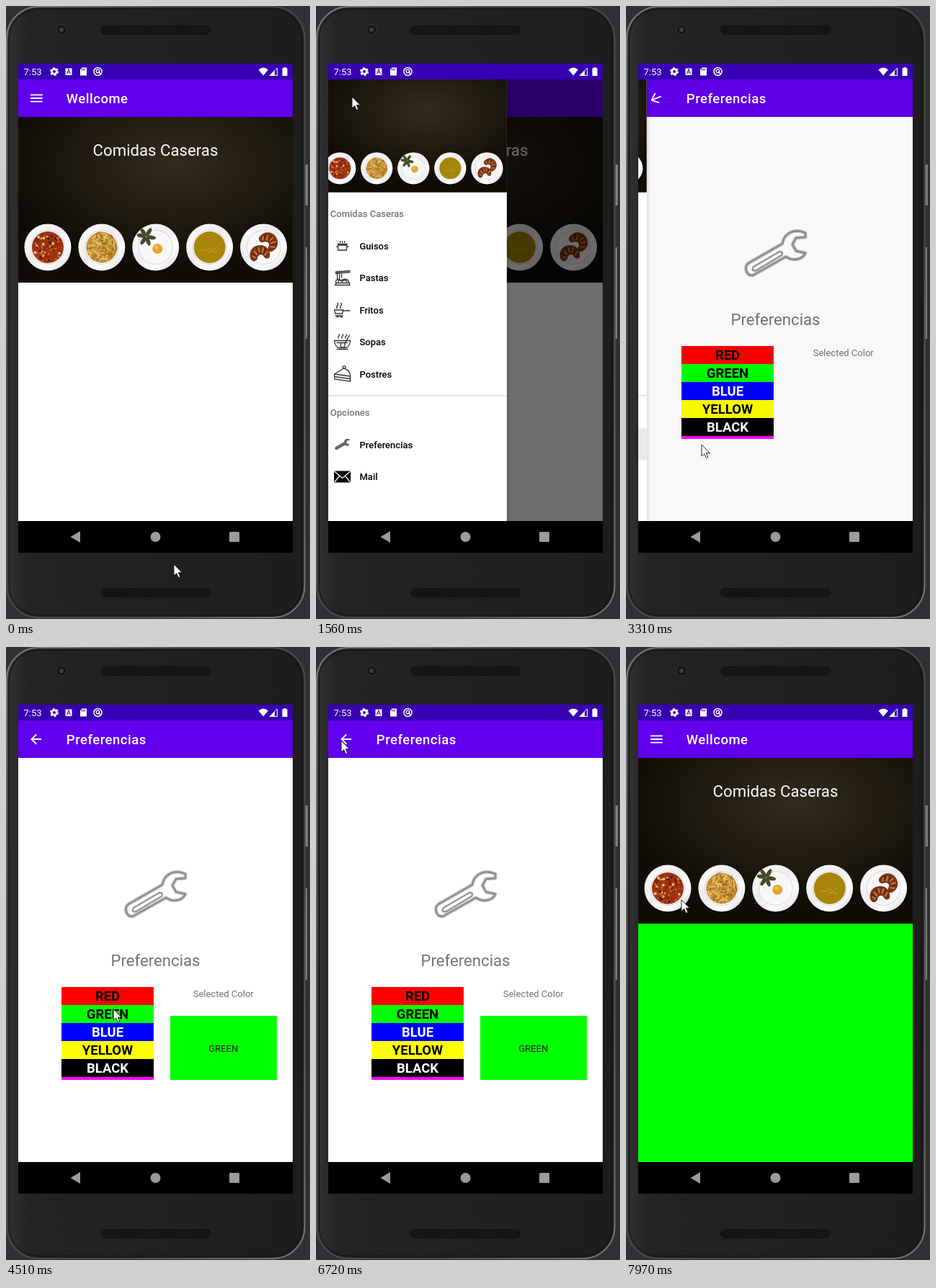
Animation, 422 px wide and 851 px high, one loop 8 s. Source, as an HTML page:

```html
<!DOCTYPE html>
<html lang="es">
<head>
<meta charset="utf-8">
<title>Comidas Caseras</title>
<style>
html, body { margin: 0; width: 100%; height: 100%; overflow: hidden; background: #303134; }
svg { display: block; width: 100%; height: 100%; }
text { font-family: Roboto, sans-serif; font-size: 13px; }
.big { font-size: 22.2px; text-anchor: middle; }
.bar { font-size: 18.5px; font-weight: 500; letter-spacing: .027em; fill: #fff; }
.mid { text-anchor: middle; }
.row { font-size: 18.5px; font-weight: 700; text-anchor: middle; }
.item { font-weight: 500; }
.grey { fill: #757575; }
.line { fill: none; stroke: #333; stroke-width: 1.3; }
</style>
</head>
<body>
<svg viewBox="0 0 422 851" preserveAspectRatio="none">
  <defs>
    <linearGradient id="shell" x2="1" y2="0">
      <stop stop-color="#333334"/><stop offset=".07" stop-color="#232324"/><stop offset="1" stop-color="#1d1d1e"/>
    </linearGradient>
    <linearGradient id="rim" x2="1" y2="1">
      <stop stop-color="#7c7d7f"/><stop offset=".3" stop-color="#4a4b4d"/><stop offset=".7" stop-color="#48494b"/><stop offset="1" stop-color="#77787a"/>
    </linearGradient>
    <radialGradient id="wall" cx=".57" cy=".28" r=".62">
      <stop stop-color="#322b1d"/><stop offset=".5" stop-color="#221c11"/><stop offset="1" stop-color="#110d06"/>
    </radialGradient>
    <linearGradient id="china" x2="1" y2="1">
      <stop stop-color="#fff"/><stop offset=".45" stop-color="#ecebee"/><stop offset=".7" stop-color="#fff"/><stop offset="1" stop-color="#cfcdd1"/>
    </linearGradient>
    <linearGradient id="shade" x2="1" y2="0">
      <stop stop-color="#000" stop-opacity=".1"/><stop offset="1" stop-color="#000" stop-opacity="0"/>
    </linearGradient>
    <pattern id="mesh" width="4" height="4" patternUnits="userSpaceOnUse">
      <rect width="4" height="4" fill="#0d0d0d"/><circle cx="1" cy="1" r=".8" fill="#303030"/><circle cx="3" cy="3" r=".8" fill="#303030"/>
    </pattern>
    <clipPath id="content"><rect x="17" y="102" width="381" height="613"/></clipPath>
    <clipPath id="list"><rect x="77" y="472" width="128" height="129"/></clipPath>
    <g id="photo">
      <rect width="381" height="230" fill="url(#wall)"/>
      <g id="plates"></g>
    </g>
    <path id="wrench" d="M249 315C236 309 220 313 217 330L170 357C163 362 167 375 176 374L222 348C232 355 245 352 249 343L236 340L231 331L236 322L249 321Z"/>
  </defs>

  <rect width="422" height="851" fill="#303134"/>
  <path d="M415.500 220h3.500v57h-3.500zM415.500 335h2.500v127h-2.500z" fill="#7b7c80"/>
  <rect x="1" y="1" width="413.500" height="848" rx="44" fill="url(#shell)" stroke="url(#rim)" stroke-width="2"/>
  <rect x="4.500" y="4.500" width="406" height="841" rx="40" fill="none" stroke="#111"/>
  <g fill="url(#mesh)" stroke="#111">
    <rect x="131.500" y="27.500" width="152" height="12" rx="6"/>
    <rect x="131.500" y="808.500" width="152" height="12" rx="6"/>
  </g>
  <circle cx="77" cy="33" r="7" fill="#151515" stroke="#353535"/>
  <circle cx="77" cy="33" r="3" fill="#3c3d40"/>

  <rect x="17" y="80" width="381" height="22" fill="#3700b3"/>
  <g fill="#fff">
    <text x="24.500" y="96">7:53</text>
    <circle cx="67" cy="91" r="3.400" fill="none" stroke="#fff" stroke-width="2.800"/>
    <circle cx="67" cy="91" r="5.200" fill="none" stroke="#fff" stroke-width="1.800" stroke-dasharray="2.700 2.745"/>
    <path d="M82.500 86.500h9v9.500h-9zM105.500 85.500h6.500v11h-9v-8z"/>
    <circle cx="127.500" cy="91" r="5.500" fill="none" stroke="#fff" stroke-width="1.500"/>
    <circle cx="127.500" cy="90.500" r="2.300" fill="none" stroke="#fff" stroke-width="1.300"/>
    <path d="M128 91l4 4" stroke="#fff" stroke-width="1.500"/>
    <path d="M350.500 88.500q6.700-6 13.400 0l-6.700 8z"/>
    <path d="M366 96.500L376.500 86V96.500Z" fill="none" stroke="#fff"/>
    <path d="M366 96.500L373 89.500V96.500ZM385.500 85h3v1.200h2v10.800h-7v-10.800h2z"/>
  </g>
  <path d="M84.500 94.500l2.500-7 2.500 7M85.500 92h3M105.500 87v2.500M107.500 87v2.500M109.500 87v2.500" fill="none" stroke="#3700b3"/>

  <g clip-path="url(#content)">
    <rect x="17" y="102" width="381" height="52" fill="#6200ee"/>
    <circle id="ripple" cx="41.500" cy="128.500" r="18" fill="#000"/>
    <path id="toggle" fill="none" stroke="#fff" stroke-width="1.850"/>
    <text id="title" class="bar" x="83.800" y="135.300"></text>

    <rect x="17" y="154" width="381" height="561" fill="#fff"/>
    <g id="home">
      <rect id="homeBack" x="17" y="154" width="381" height="561"/>
      <use href="#photo" x="17" y="154"/>
      <text class="big" x="207.500" y="208" fill="#fff">Comidas Caseras</text>
    </g>
    <g id="prefs">
      <g fill="none" stroke-linejoin="round">
        <use href="#wrench" stroke="#c9c9cc" stroke-width="5"/>
        <use href="#wrench" stroke="#8d8d92" stroke-width="2.500"/>
        <path d="M177 362L213 341Q219 341 216 346L181 367Q173 369 177 362Z" stroke="#97979c" stroke-width="2.500"/>
      </g>
      <text class="big grey" x="207.500" y="443">Preferencias</text>
      <g id="rows" clip-path="url(#list)"></g>
      <text class="mid grey" x="301.700" y="486">Selected Color</text>
      <g id="choice">
        <rect x="228" y="512" width="148" height="89" fill="#0f0"/>
        <text class="mid" x="301.700" y="561.700" fill="#1c1c1c">GREEN</text>
      </g>
    </g>

    <rect id="scrim" x="17" y="102" width="381" height="613"/>
    <g id="drawer">
      <rect x="276.600" y="102" width="6" height="613" fill="url(#shade)"/>
      <rect x="17" y="102" width="259.600" height="613" fill="#fff"/>
      <use href="#photo" transform="translate(17 102) scale(.6814)"/>
      <rect id="pressed" x="17" y="586" width="259.600" height="44.500"/>
      <path d="M17 541h259.600" stroke="#dedede" stroke-width="1.500"/>
      <text class="item grey" x="31.500" y="293">Comidas Caseras</text>
      <text class="item grey" x="31.500" y="569">Opciones</text>
      <g id="menu"></g>
    </g>
  </g>

  <rect x="17" y="715" width="381" height="44"/>
  <g fill="#9b9b9b">
    <path d="M89.500 737L103 729V745Z"/>
    <circle cx="207.500" cy="737" r="7"/>
    <rect x="310" y="730" width="14" height="14" rx="1.500"/>
  </g>
  <path id="cursor" d="M0 0V16L3.700 12.600L6.300 18.500L8.800 17.400L6.300 11.600H11.300Z" fill="#fff" stroke="#111" stroke-width=".9"/>
</svg>

<script>
const LOOP = 8000;
const $ = id => document.getElementById(id);
const clamp = v => Math.min(1, Math.max(0, v));
const lerp = (a, b, p) => a + (b - a) * p;
const span = (t, start, length) => clamp((t - start) / length);
const quint = u => 1 - (1 - u) ** 5;
const smooth = u => .5 - Math.cos(u * Math.PI) / 2;

let seed = 7;
const random = () => (seed = seed * 16807 % 2147483647) / 2147483647;

// Bits of food scattered over a disc
function scatter(count, radius, colors, draw) {
  let out = '';
  for (let i = 0; i < count; i++) {
    const a = random() * 2 * Math.PI, r = Math.sqrt(random()) * radius;
    out += draw(r * Math.cos(a), r * Math.sin(a), colors[i % colors.length]);
  }
  return out;
}
const disc = (x, y, r, fill) => `<circle cx="${x}" cy="${y}" r="${r}" fill="${fill}"/>`;
const crumb = (x, y, c) => disc(x, y, .8 + random() * 1.3, c);
const noodle = (x, y, c) => `<path d="M-4 0q4-4 8 0" fill="none" stroke="${c}" stroke-width="1.1"
  transform="translate(${x} ${y}) rotate(${random() * 360})"/>`;
const leaf = a => `<ellipse cx="7" rx="6.500" ry="2.800" fill="#454a2b" transform="translate(-13 -15) rotate(${a})"/>`;
const croissant = (x, y, turn) => `<g transform="translate(${x} ${y}) rotate(${turn})">
  <path d="M-14 6C-16-5-8-12 1-11C10-10 15-3 13 6C11 11 5 9 4 4Q0 0-4 5C-5 11-12 12-14 6Z" fill="#7d3415"/>
  <path d="M-11 2l4 4M-8-4l4 6M-1-8l0 7M6-7l-3 7M11-1l-5 5" stroke="#c67c48" stroke-width="2"/>
  <path d="M-12-1l5 4M-4-8l2 7M9-5l-4 6" stroke="#4d1d0b"/></g>`;

const foods = [
  disc(0, 0, 22, '#9c3211') + scatter(90, 20.5, ['#c04a1c', '#e8bd7c', '#55180a', '#d4652c', '#8a2209'], crumb),
  disc(0, 0, 21.5, '#c08a30') + scatter(110, 19, ['#edcb7c', '#96641c', '#dba945'], noodle),
  disc(3, 2, 13, '#f8f7f4') + disc(2.5, 2, 7, '#e5a42e') + disc(1, 0, 2.5, '#f3c65c') + [10, 70, 125, 190, 235, 300].map(leaf).join(''),
  disc(0, 0, 22, '#a78609') + '<path d="M-12 4h7l4-3 5 3 7-5M-2 6l12 1" fill="none" stroke="#c6a630"/>',
  croissant(8, -8, 50) + croissant(-5, 8, -8)
];
$('plates').innerHTML = foods.map((food, i) => `<g transform="translate(${41 + i * 74.9} 181)">
  ${disc(1, 2, 33, '#0006')}${disc(0, 0, 32.5, 'url(#china)')}
  <circle r="23.500" fill="#f7f6f8" stroke="#d9d7dc"/>${food}</g>`).join('');

$('rows').innerHTML = [
  ['RED', '#f00'], ['GREEN', '#0f0'], ['BLUE', '#00f', '#fff'],
  ['YELLOW', '#ff0'], ['BLACK', '#000', '#fff'], ['', '#f0f']
].map(([name, back, ink = '#000'], i) => `<rect x="77" y="${472 + i * 25}" width="128" height="25" fill="${back}"/>
  <text class="row" x="141" y="${491.3 + i * 25}" fill="${ink}">${name}</text>`).join('');

const line = d => `<path class="line" d="${d}"/>`;
const steam = 'M-5-5q-2-2 0-3t0-3M0-5q-2-2 0-3t0-3M5-5q-2-2 0-3t0-3';
$('menu').innerHTML = [
  ['Guisos', 333, line('M-6-1H6V6H-6ZM-8.500 1h2.500M6 1h2.500M-7-2.500H7M-3-4v-3M0-4v-3M3-4v-3')],
  ['Pastas', 377.5, line('M-11 10H11M-9 10V7H10V10M-9 7C-10 1-4 1-2 4C1 0 9 1 9 7M-6 6a3 3 0 0 1 6 0a3 3 0 0 1 6 0M-7 2V-10M-4 2V-10M-1 0V-10M-10-6L11-8M-10-8L11-10')],
  ['Fritos', 422, line('M-11 0H1L0 5H-10ZM1 1H11M-7-2q-2-2 0-4t0-4M-2-2q-2-2 0-4t0-4M-10 8h11M-8 10.500q2-3 3 0M-3 10.500q2-3 3 0')],
  ['Sopas', 466.5, line('M-11-2H11Q10 8 4 8H-4Q-10 8-11-2ZM-8 10H8M-8 1H7M10-10L3 3a3 3 0 1 1-4-1') + line(steam)],
  ['Postres', 511, line('M-11 0L2-8Q10-6 11 2V10L-11 7ZM-11 0L11 3M-11 3.500L11 6.500M1-8a2 2 0 1 1 3 0')],
  ['Preferencias', 609, '<use href="#wrench" transform="scale(.25) translate(-208 -345)" fill="#66666a"/>'],
  ['Mail', 653.5, '<path d="M-11.500-8h23V8h-23z"/><path d="M-11-7.500L0 2L11-7.500M-11 7.500L-4-1M11 7.500L4-1" fill="none" stroke="#fff" stroke-width="1.200"/>']
].map(([name, y, icon]) => `<g transform="translate(48.300 ${y})">${icon}</g>
  <text class="item" x="72.200" y="${y + 4.6}">${name}</text>`).join('');

// time, x, y
const route = [
  [50, 233, 775], [870, 55, 127], [1050, 43, 130], [1350, 43, 130], [1540, 50, 126],
  [1700, 50, 126], [2500, 93, 592], [2760, 105, 603], [2910, 105, 609], [3330, 105, 609],
  [3840, 146, 497], [4240, 149, 502], [4800, 149, 503], [5400, 333, 567], [5600, 327, 553],
  [5640, 327, 553], [6440, 116, 200], [6720, 35, 130], [7200, 36, 131], [7740, 62, 363], [7960, 77, 351]
];
function pointer(t) {
  const next = route.findIndex(p => p[0] > t);
  if (next < 1) return (next ? route[route.length - 1] : route[0]).slice(1);
  const [a, b] = [route[next - 1], route[next]];
  const p = smooth(span(t, a[0], b[0] - a[0]));
  return [lerp(a[1], b[1], p), lerp(a[2], b[2], p)];
}

// Three bars folding into a back arrow while turning half a circle
function drawToggle(p) {
  const dp = .927, angle = p * Math.PI / 4;
  const head = lerp(18, Math.SQRT2 * 8, p) * dp, shaft = lerp(18, 16, p) * dp;
  const cut = .7 * p, gap = lerp(5, -.7, p) * dp, left = -shaft / 2;
  const dx = head * Math.cos(angle), dy = head * Math.sin(angle);
  $('toggle').setAttribute('d', `M${left + cut} 0h${shaft - 2 * cut}M${left} ${gap}l${dx} ${dy}M${left} ${-gap}l${dx} ${-dy}`);
  $('toggle').setAttribute('transform', `translate(42.300 128) rotate(${-180 * (1 - p)})`);
}

const pulse = (t, start) => .13 * span(t, start, 90) * (1 - span(t, start + 280, 200));
const OPEN = 1330, ENTER = 3080, BACK = 7080;

function render(t) {
  const open = quint(span(t, OPEN, 500)) - quint(span(t, ENTER, 500));
  const page = span(t, ENTER, 220) - span(t, BACK, 220);
  $('home').setAttribute('opacity', 1 - page);
  $('prefs').setAttribute('opacity', page);
  $('homeBack').setAttribute('fill', t < 4440 ? '#fff' : '#0f0');
  $('choice').setAttribute('opacity', t < 4440 ? 0 : 1);
  $('title').textContent = t >= ENTER && t < BACK ? 'Preferencias' : 'Wellcome';
  drawToggle(smooth(span(t, ENTER, 300)) - smooth(span(t, BACK, 300)));
  $('ripple').setAttribute('opacity', pulse(t, 1240) + pulse(t, 6970));
  $('scrim').setAttribute('opacity', .6 * open);
  $('drawer').setAttribute('transform', `translate(${-259.6 * (1 - open)} 0)`);
  $('drawer').setAttribute('visibility', open > 0 ? 'visible' : 'hidden');
  $('pressed').setAttribute('opacity', .09 * span(t, 3030, 80));
  $('cursor').setAttribute('transform', `translate(${pointer(t)})`);
}

const start = performance.now();
function tick() {
  render((performance.now() - start) % LOOP);
  requestAnimationFrame(tick);
}
tick();
</script>
</body>
</html>
```
